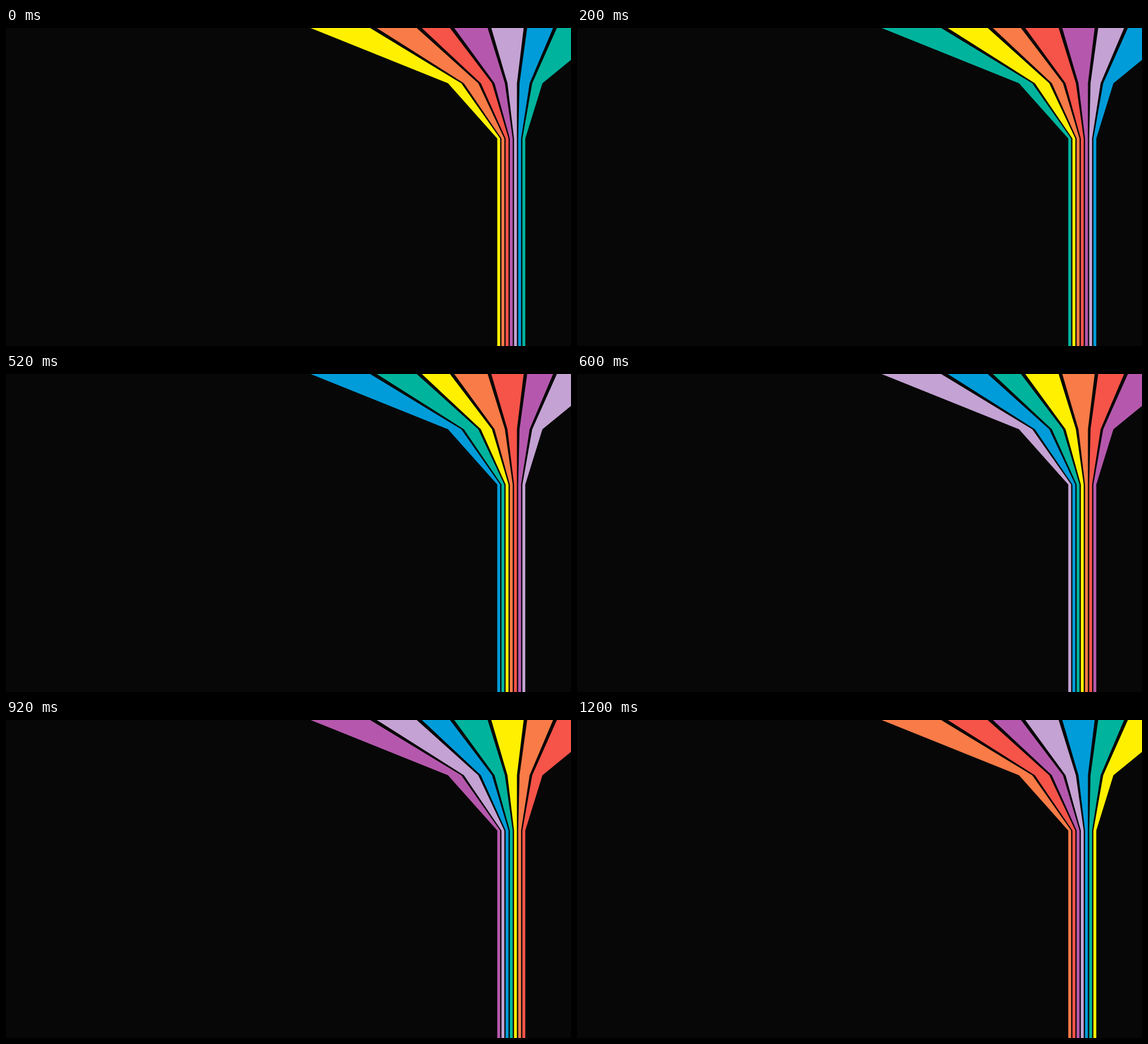
Animation of 998x561 px, one loop 1400 ms. Source, as an HTML page:

```html
<!DOCTYPE html>
<html lang="en">
<head>
<meta charset="utf-8">
<title>Rainbow stripes</title>
<style>
  html, body { margin: 0; width: 100%; height: 100%; overflow: hidden; background: #070707; }
  svg { display: block; width: 998px; height: 561px; }
</style>
</head>
<body>
<svg id="stage" viewBox="0 0 998 561"></svg>
<script>
const STEP = 200;
const BEND_Y = 97.5, TRUNK_Y = 195, BOTTOM = 561;
const colors = ['#fff000', '#f97b47', '#f65349', '#b558ad', '#c4a2d3', '#009cd9', '#00b39d'];

// Centre lines of the gaps around the stripes, at the top and at the first bend
const topX = [529.5, 649, 730, 788, 854, 917.5, 969.7, 1072];
const bendX = [778.5, 806.5, 836.5, 860.7, 883.5, 904.8, 927.2, 949.8];

// Edge beside gap i: side 1 is its right, -1 its left; gaps narrow downwards
function edge(i, side) {
  const a = topX[i], b = bendX[i], trunk = 866.6 + 7.4 * i + side * 1.15;
  const slant = Math.hypot(1, (b - a) / BEND_Y);
  return [
    [a + side * 3.1 * slant, 0],
    [b + side * 2.3, BEND_Y],
    [trunk, TRUNK_Y],
    [trunk, BOTTOM]
  ];
}

const stage = document.getElementById('stage');
const stripes = colors.map((_, i) => {
  const stripe = document.createElementNS('http://www.w3.org/2000/svg', 'polygon');
  stripe.setAttribute('points', [...edge(i, 1), ...edge(i + 1, -1).reverse()].join(' '));
  return stage.appendChild(stripe);
});

// Every step each colour hops one stripe to the right
function draw() {
  const n = colors.length;
  const shift = Math.floor(performance.now() / STEP) % n;
  stripes.forEach((s, i) => s.setAttribute('fill', colors[(i - shift + n) % n]));
  requestAnimationFrame(draw);
}
draw();
</script>
</body>
</html>
```
